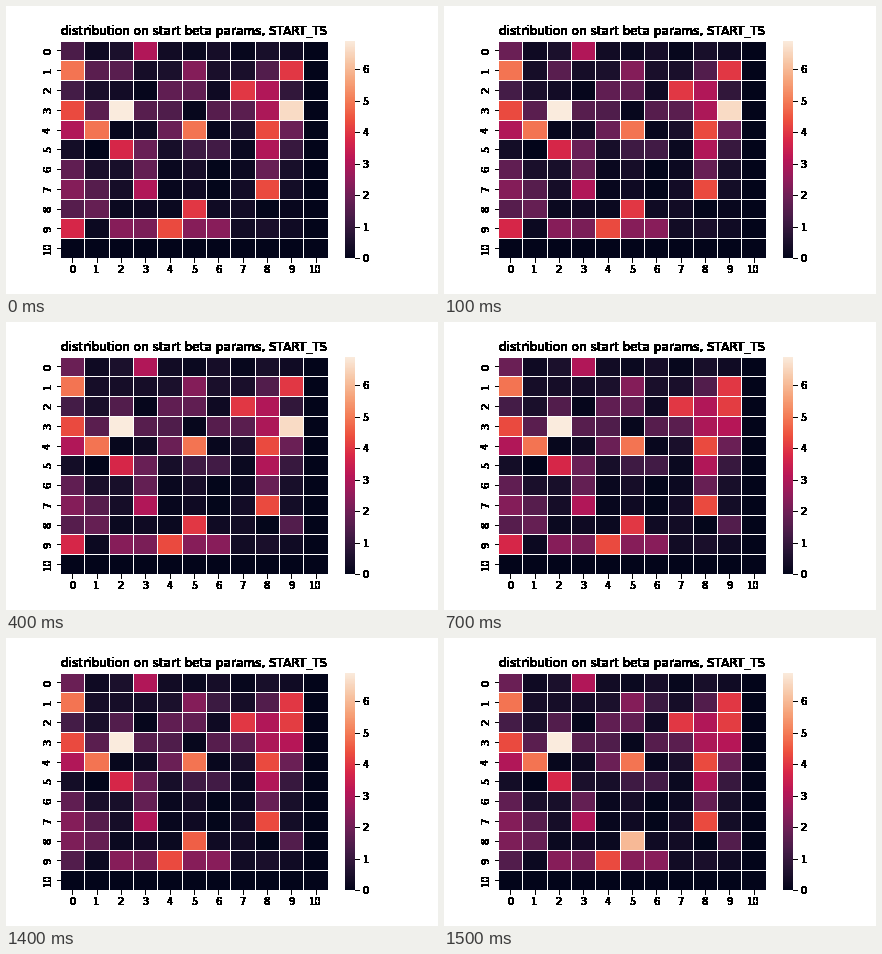
Recreate the animation shown at these times as a matplotlib script. Size 432 by 288 pixels, loop 6200 ms.

```python
import numpy as np
import matplotlib.pyplot as plt
from matplotlib.animation import FuncAnimation
from matplotlib.colors import LinearSegmentedColormap

W, H, DPI = 432, 288, 72
STEP_MS, STEPS = 100, 62
N, VMAX = 11, 6.91

plt.rcParams["font.family"] = "DejaVu Sans"
plt.rcParams["font.size"] = 10

ROCKET = LinearSegmentedColormap.from_list("rocket", [
    "#03051a", "#221331", "#451c47", "#691f55", "#921c5b", "#b91657",
    "#d92847", "#ed503e", "#f47d57", "#f6a47b", "#f7c9aa", "#faebdd"])

# Warm streaks along rows and columns, added to low noise.
BANDS = [
    (np.s_[:3, 0], 0.9), (np.s_[6:9, 0], 1.5), (np.s_[1, 1:3], 1.4),
    (np.s_[2, 4:6], 1.5), (np.s_[3, 1:9], 1.3), (np.s_[5, 5:7], 1.0),
    (np.s_[5:7, 3], 1.6), (np.s_[7:9, 1], 1.5), (np.s_[9, 2:7], 2.1),
    (np.s_[1:7, 8], 1.4), (np.s_[2:6, 9], 0.8),
]

# Single cells that stand out, grouped by level.
PEAKS = {
    6.9: [(3, 2)],
    6.6: [(3, 9)],
    4.9: [(1, 0), (4, 1), (4, 5)],
    4.3: [(3, 0), (4, 8), (7, 8), (9, 4)],
    4.0: [(1, 9), (2, 7), (8, 5)],
    3.7: [(5, 2), (9, 0)],
    3.0: [(0, 3), (2, 8), (4, 0), (5, 8), (7, 3)],
    2.3: [(1, 5), (7, 0)],
    1.9: [(4, 4), (4, 9)],
    0.1: [(3, 5), (4, 2)],
}

# time in ms -> {(row, column): new value}
UPDATES = {
    100: {(0, 0): 1.9, (1, 1): 0.4},
    200: {(1, 2): 0.4, (2, 2): 1.5},
    400: {(8, 9): 1.5},
    700: {(2, 9): 4.1, (3, 9): 3.1},
    1100: {(1, 7): 0.4},
    1400: {(1, 6): 1.1, (8, 0): 2.2, (8, 5): 4.6, (9, 0): 1.5},
    1500: {(5, 3): 0.5, (8, 5): 6.0},
}


def start_grid():
    grid = np.zeros((N, N))
    grid[:-1, :-1] = np.random.default_rng(4).uniform(0, 0.5, (N - 1, N - 1))
    for area, level in BANDS:
        grid[area] += level
    for level, cells in PEAKS.items():
        for cell in cells:
            grid[cell] = level
    return grid


def values_at(ms):
    grid = START.copy()
    for start, cells in UPDATES.items():
        if start <= ms:
            for cell, value in cells.items():
                grid[cell] = value
    return grid


START = start_grid()
fig = plt.figure(figsize=(W / DPI, H / DPI), dpi=DPI, facecolor="white")

left, bottom, top, full = 0.125, 0.125, 0.88, 0.775
height = top - bottom
map_box = [left, bottom, 0.8 * full, height]
bar_box = [left + 0.85 * full, bottom, height * H / 20 / W, height]


def map_axes():
    ax = fig.add_axes(map_box, frameon=False)
    ax.set(xlim=(0, N), ylim=(N, 0))
    return ax


def bar_axes():
    ax = fig.add_axes(bar_box, frameon=False)
    ax.set(xlim=(0, 1), ylim=(0, VMAX), xticks=[])
    ax.yaxis.tick_right()
    return ax


def label_ink():
    """Render the labels once and harden every inked pixel to black."""
    ax = map_axes()
    centers = np.arange(N) + 0.5
    ax.set_xticks(centers, range(N))
    ax.set_yticks(centers, range(N), rotation=90, va="center")
    ax.set_title("distribution on start beta params, START_TS", fontsize=12)
    bar_axes().set_yticks(range(7))
    fig.canvas.draw()
    shot = np.asarray(fig.canvas.buffer_rgba())
    ink = np.zeros(shot.shape)
    ink[..., 3] = shot[..., 0] < 255
    fig.clear()
    return ink


fig.figimage(label_ink(), origin="upper")

ax = map_axes()
ax.axis("off")
mesh = ax.pcolormesh(np.arange(N + 1), np.arange(N + 1), START, cmap=ROCKET,
                     vmin=0, vmax=VMAX, edgecolors="white", linewidth=1)

bar = bar_axes()
bar.axis("off")
bar.pcolormesh([0, 1], np.linspace(0, VMAX, 257),
               np.linspace(0, 1, 256)[:, None], cmap=ROCKET)


def update(i):
    mesh.set_array(values_at(i * STEP_MS))
    return [mesh]


anim = FuncAnimation(fig, update, frames=STEPS, interval=STEP_MS,
                     init_func=lambda: update(0), repeat=True, repeat_delay=0)
plt.show()
```
